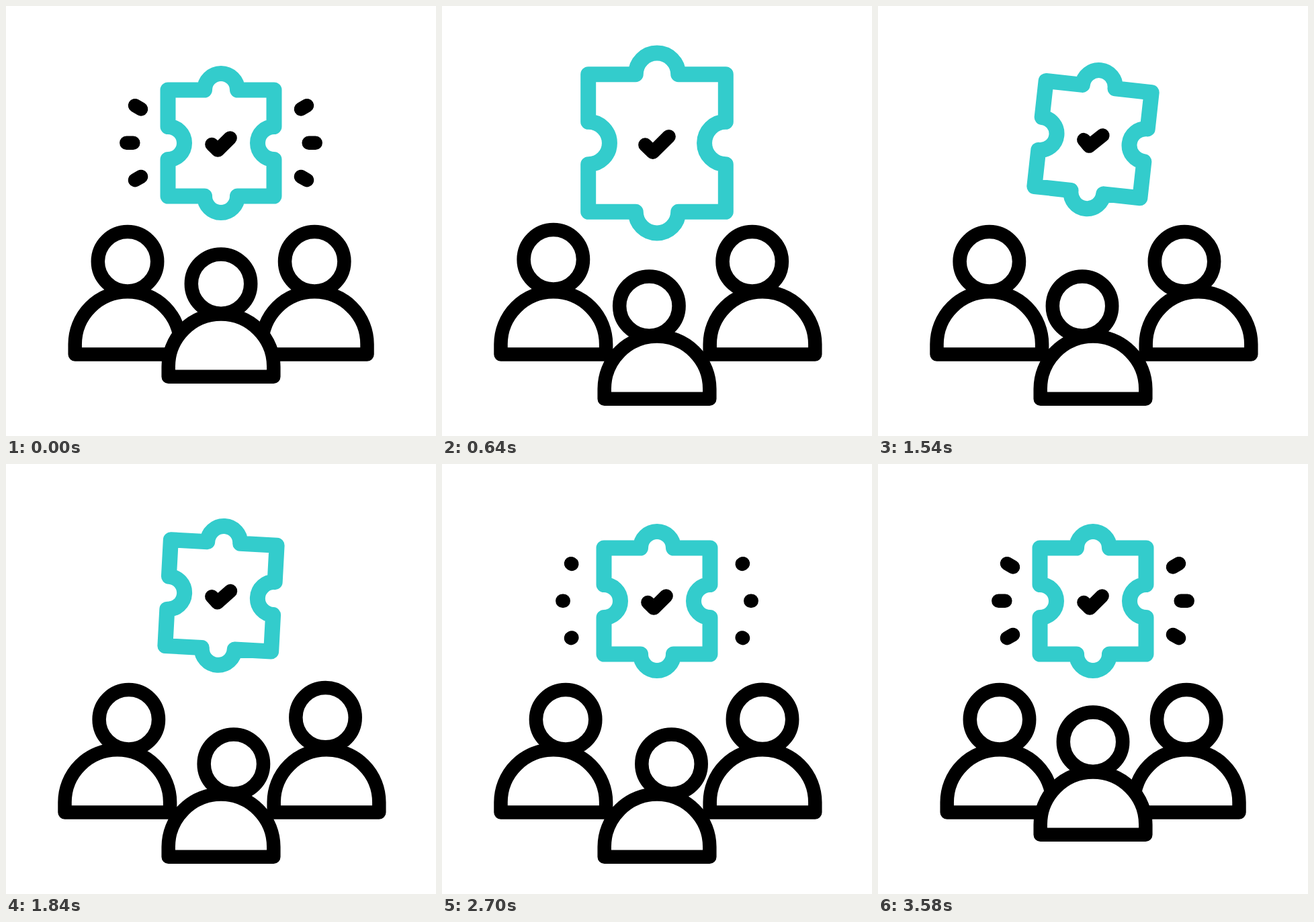
Write an HTML page that moves like this. It is 640 px wide and 640 px high and loops after 3600 ms.

```html
<!DOCTYPE html>
<html lang="en">
<head>
<meta charset="utf-8">
<title>Team solution</title>
<style>
  html, body { margin: 0; width: 100%; height: 100%; overflow: hidden; background: #fff; }
  svg { display: block; width: 100%; height: 100%; }
  path, circle { stroke: #000; stroke-linecap: round; stroke-linejoin: round; }
  .body, .head { fill: #fff; stroke-width: 20.5; }
  .spark, #check { fill: none; stroke-width: 20.5; }
  #piece { fill: none; stroke: #33cccc; stroke-width: 23; }
</style>
</head>
<body>
<svg id="stage" viewBox="0 0 640 640">
  <g id="team"></g>
  <g id="sparks"></g>
  <g id="puzzle"><path id="piece"/><path id="check"/></g>
</svg>
<script>
const LOOP = 3600;
const $ = id => document.getElementById(id);

function add(parent, tag, attrs) {
  const el = document.createElementNS("http://www.w3.org/2000/svg", tag);
  for (const k in attrs) el.setAttribute(k, attrs[k]);
  return parent.appendChild(el);
}

const ease = p => p * p * (3 - 2 * p);

// Piecewise eased track: [[time, value], ...]
function track(keys, t, curve = ease) {
  if (t <= keys[0][0]) return keys[0][1];
  for (let i = 1; i < keys.length; i++) {
    const [t0, a] = keys[i - 1], [t1, b] = keys[i];
    if (t < t1) return a + (b - a) * curve((t - t0) / (t1 - t0));
  }
  return keys[keys.length - 1][1];
}

// Home base point, outward shift, and head offsets for the two glances
const people = [
  { x: 181, y: 518.5, dx: -15.2, dy: 0, look: [0, 18.3], nod: [500, 620, 1640] },
  { x: 459.2, y: 518.5, dx: 17.8, dy: 0, look: [-21, 0], nod: [1640, 1860, 3160] },
  { x: 320, y: 551.8, dx: 0, dy: 33, look: [-16, 21.5] }
];
for (const p of people) {
  p.body = add($("team"), "path", {
    class: "body",
    d: "M-78.3 0V-15A78.3 78.3 0 0 1 78.3 -15V0Z"
  });
  p.head = add($("team"), "circle", { class: "head", r: 44.2 });
}

// Outer end, then the vector to the inner end, for the left side
const rays = [[192, 148.2, 9, 5.2], [179.3, 203.7, 10, 0], [192, 259.2, 9, -5.2]];
const sparks = [];
for (const [x, y, dx, dy] of rays) {
  for (const side of [1, -1]) {
    const el = add($("sparks"), "path", { class: "spark" });
    sparks.push({ el, x: side > 0 ? x : 640 - x, y, dx: dx * side, dy });
  }
}

function piecePath(s) {
  const h = 79 * s, r = 24.5 * s;
  const arc = (x, y, sweep) => `A${r} ${r} 0 0 ${sweep} ${x} ${y}`;
  return `M${-h} ${-h}H${-r}${arc(r, -h, 1)}H${h}V${-r}${arc(h, r, 0)}` +
    `V${h}H${r}${arc(-r, h, 1)}H${-h}V${r}${arc(-h, -r, 0)}Z`;
}

function checkPath(s) {
  return `M${-13.6 * s} ${2 * s}L${-4.8 * s} ${10.6 * s}L${13.6 * s} ${-7.6 * s}`;
}

function drawTeam(t) {
  const out = track([[20, 0], [440, 1], [3200, 1], [3560, 0]], t);
  for (const p of people) {
    const x = p.x + p.dx * out, y = p.y + p.dy * out;
    const [a, b] = p.look;
    const look = track([[490, 0], [720, a], [1640, a], [1880, b], [3000, b], [3240, 0]], t);
    let nod = 0;
    if (p.nod) {
      const [t0, t1, t2] = p.nod;
      nod = t < t1 ? track([[t0, 0], [t1, -3.2]], t)
                   : track([[t1, -3.2], [t2, 0]], t, q => q * (2 - q));
    }
    p.body.setAttribute("transform", `translate(${x} ${y})`);
    p.head.setAttribute("cx", x + look);
    p.head.setAttribute("cy", y - 138.2 + nod);
  }
}

function drawSparks(t) {
  const len = track([[20, 1], [360, 0], [2620, 0], [2960, 1]], t);
  $("sparks").style.display = len > 0.002 ? "" : "none";
  for (const s of sparks) {
    s.el.setAttribute("d", `M${s.x} ${s.y}l${s.dx * len} ${s.dy * len}`);
  }
}

function drawPuzzle(t) {
  const size = track([[500, 1], [640, 1.295], [680, 1.295], [1040, 1]], t);
  const turn = track([[680, 0], [1040, -9.5], [1670, 8.2], [2150, -9.5], [2600, 0]], t);
  const hop = (a, b) => t > a && t < b ? 9 * Math.sin(Math.PI * (t - a) / (b - a)) : 0;
  const lift = hop(1040, 1670) + hop(1670, 2150);
  $("piece").setAttribute("d", piecePath(size));
  $("check").setAttribute("d", checkPath(size));
  $("puzzle").setAttribute("transform", `translate(320 ${204 - lift}) rotate(${turn})`);
}

function draw(t) {
  drawTeam(t);
  drawSparks(t);
  drawPuzzle(t);
}

const start = performance.now();
function tick() {
  draw((performance.now() - start) % LOOP);
  requestAnimationFrame(tick);
}
draw(0);
requestAnimationFrame(tick);
</script>
</body>
</html>
```
